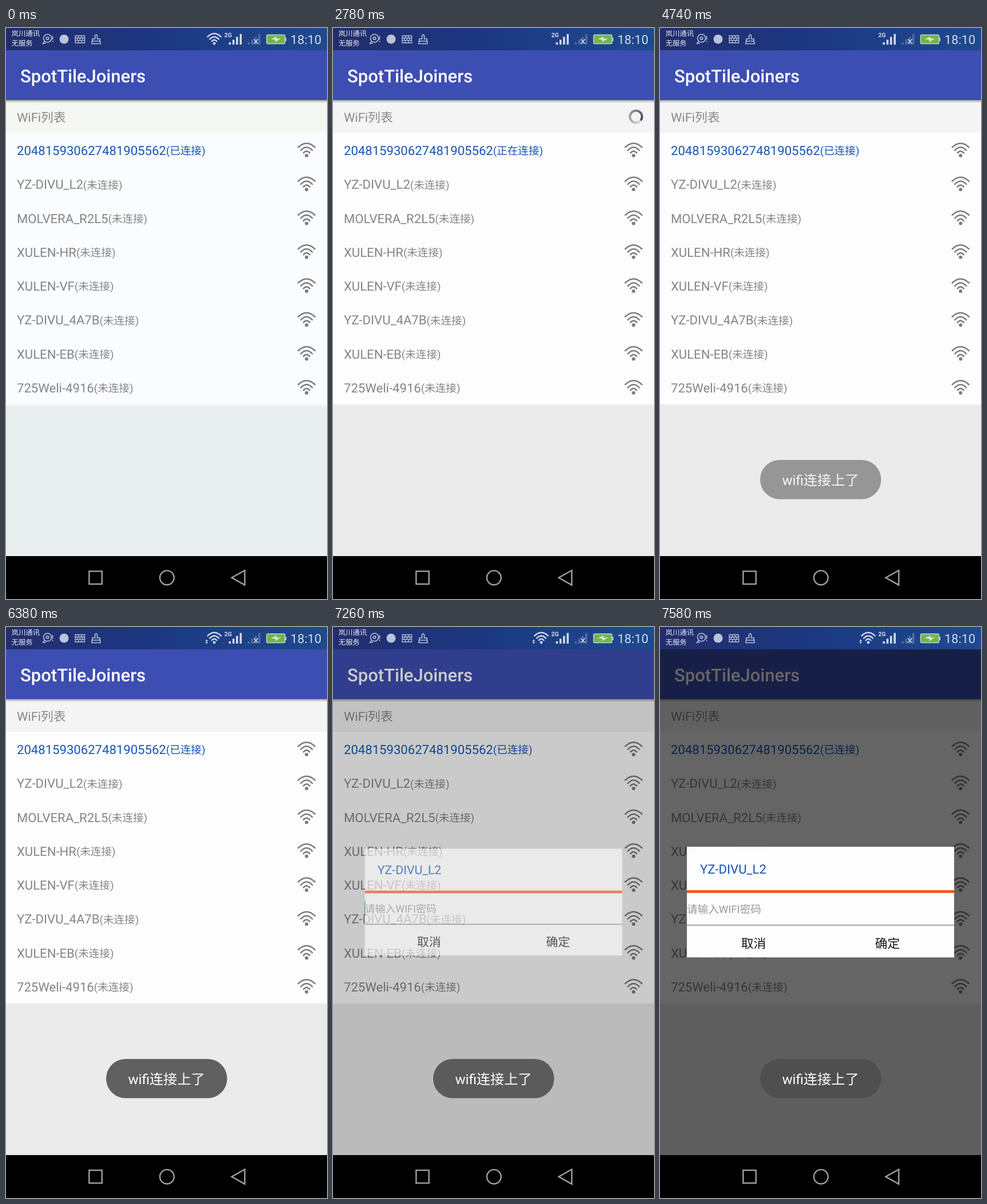
These frames come from a looping animation (561 by 998 pixels, 8000 ms). An HTML page:

```html
<!DOCTYPE html>
<html lang="zh-CN">
<head>
<meta charset="utf-8">
<title>Wi-Fi list</title>
<style>
  html, body { margin: 0; width: 100%; height: 100%; overflow: hidden; background: #000; }
  svg { display: block; width: 100%; height: 100%; }
  text { font-family: Roboto, 'Noto Sans CJK SC', 'Noto Sans CJK', sans-serif; text-rendering: geometricPrecision; }
  .row { font-size: 22.1px; fill: #858585; }
  .state { font-size: 18.6px; }
  .wifi path { fill: none; stroke-linecap: round; }
</style>
</head>
<body>
<svg viewBox="0 0 561 998" preserveAspectRatio="none">
  <defs>
    <linearGradient id="barFill">
      <stop offset="0" stop-color="#222e6c"/>
      <stop offset=".45" stop-color="#1c3782"/>
      <stop offset="1" stop-color="#1f4a8e"/>
    </linearGradient>
    <linearGradient id="shade" x2="0" y2="1">
      <stop offset="0" stop-opacity=".32"/>
      <stop offset="1" stop-opacity="0"/>
    </linearGradient>
    <g id="wifi" class="wifi">
      <path d="M-14.600-14.500Q0-28.500 14.600-14.500M-10-9.200Q0-19.600 10-9.200M-5.400-4.600Q0-11 5.400-4.600"/>
      <circle r="3" stroke="none"/>
    </g>
  </defs>

  <!-- page -->
  <rect id="page" y="39" width="561" height="884"/>
  <rect id="head" y="126" width="561" height="57"/>
  <rect id="list" y="183" width="561" height="475"/>
  <rect id="edge" y="658" width="561" height="3" fill="#f3f6f8"/>
  <text x="19" y="163.700" font-size="21.800" fill="#888">WiFi列表</text>
  <g id="rows"></g>
  <g id="spinner" fill="none" stroke-width="3.800"></g>
  <rect y="39" width="561" height="87" fill="#3d4eb2"/>
  <rect y="126" width="561" height="5" fill="url(#shade)"/>
  <text x="25" y="95" font-size="31" font-weight="500" fill="#fff">SpotTileJoiners</text>
  <rect id="dim" y="39" width="561" height="884"/>

  <!-- status bar -->
  <rect width="561" height="39" fill="url(#barFill)"/>
  <g fill="#d3dae8">
    <g font-size="12.400" font-weight="500" fill="#e6eaf4">
      <text x="9.500" y="13.500">岚川通讯</text>
      <text x="9.500" y="30.500">无服务</text>
    </g>
    <text x="497" y="28" font-size="21.800">18:10</text>
    <text x="381.500" y="15.500" font-size="10.500" font-weight="700">2G</text>
    <path d="M389.500 25h3.500v4h-3.500zM395.800 20.500h3.500v8.500h-3.500zM402 15.500h3.500v13.500h-3.500zM408.500 10.500h3.500v18.500h-3.500z"/>
    <path d="M422.500 25h3.500v4h-3.500zM428.500 20.500h3.500v8.500h-3.500zM434.800 15.500h3.500v13.500h-3.500zM441 10.500h3.500v18.500h-3.500z" opacity=".28"/>
    <path d="M433 19.500l7.500 8M440.500 19.500l-7.500 8" stroke="#d3dae8" stroke-width="1.600"/>
  </g>
  <g fill="none" stroke="#b9c3da" stroke-width="1.600">
    <circle cx="72.500" cy="18" r="7"/>
    <circle cx="72.500" cy="18" r="2.300"/>
    <path d="M67.500 23.500l-3 3.500h5M81.500 14v6.500M81.500 22.500v2"/>
    <circle cx="101.500" cy="19.500" r="8" fill="#b9c3da" stroke="none"/>
    <path d="M121 13.500h16.500v12.500h-16.500zM121 17.500h16.500M121 21.700h16.500M126.500 13.500v4M132 13.500v4M124.500 17.500v4M129.300 17.500v4M134 17.500v4M126.500 21.700v4M132 21.700v4" stroke-width="1.300"/>
    <path d="M155.500 19v-5.500q2-4 4 0v5.500h4.500l1 8.500h-15l1-8.500zM151 23h13"/>
  </g>
  <rect x="455.500" y="12" width="32" height="15.500" rx="2" fill="#70b64c" stroke="#c3d3cf" stroke-width="1.500"/>
  <path d="M488.500 17h1.500v6h-1.500zM463 19.500l10-4.500l-.5 3.700l8-.5l-10 6.300l.5-4z" fill="#dfeadb"/>
  <g id="signal">
    <use href="#wifi" transform="translate(364 27) scale(.8)" fill="#d0d8e8" stroke="#d0d8e8" stroke-width="2.900"/>
    <path id="arrows" d="M348.500 25l2.200-3.500 2.200 3.500zM348.500 26l2.200 3.500 2.200-3.500z" fill="#d0d8e8"/>
  </g>

  <!-- password dialog -->
  <g id="dialog">
    <rect x="47" y="384" width="467" height="193.500" fill="#fdfdfd"/>
    <text x="70" y="430.500" font-size="22.100" fill="#1652b2" id="dialogName"></text>
    <rect x="47" y="460" width="467" height="4.800" fill="#fb5423"/>
    <text x="47" y="500" font-size="18.600" fill="#999">请输入WIFI密码</text>
    <rect id="caret" x="46.500" y="479" width="1.600" height="26" fill="#2f8f96"/>
    <rect x="47" y="520.500" width="467" height="1.200" fill="#66668a"/>
    <g font-size="21.800" fill="#151515" text-anchor="middle">
      <text x="163.500" y="561">取消</text>
      <text x="397.500" y="561">确定</text>
    </g>
  </g>

  <g id="toast">
    <rect x="175" y="755" width="211.500" height="68.500" rx="34" fill="#4e4e4e" fill-opacity=".88"/>
    <text x="280.500" y="798.500" font-size="24.200" fill="#fff" text-anchor="middle">wifi连接上了</text>
  </g>

  <!-- navigation bar -->
  <rect y="923" width="561" height="75"/>
  <g fill="none" stroke="#a0a0a0" stroke-width="2.400">
    <rect x="145.300" y="949.500" width="22.400" height="22.400"/>
    <circle cx="281.300" cy="960.800" r="12.400"/>
    <path d="M394.500 960.800l22.800-12.800v25.600z"/>
  </g>
</svg>
<script>
const LOOP = 8000;
const BLUE = '#1756b4', GRAY = '#858585';
const names = [
  '204815930627481905562', 'YZ-DIVU_L2', 'MOLVERA_R2L5', 'XULEN-HR',
  'XULEN-VF', 'YZ-DIVU_4A7B', 'XULEN-EB', '725Weli-4916'
];
const $ = id => document.getElementById(id);
const clamp = v => Math.max(0, Math.min(1, v));
const span = (t, a, b) => clamp((t - a) / (b - a));
const fill = (id, color) => $(id).setAttribute('fill', color);
const fade = (id, v) => {
  $(id).setAttribute('opacity', v);
  $(id).style.display = v > 0 ? '' : 'none';
};

$('rows').innerHTML = names.map((name, i) => {
  const y = 222.2 + i * 59.25;
  return `<text class="row" x="19" y="${y}"><tspan>${name}</tspan><tspan class="state" dy="-.8">(未连接)</tspan></text>
    <use href="#wifi" x="525.3" y="${y + .8}" fill="#7c7c7c" stroke="#7c7c7c" stroke-width="2.5"/>`;
}).join('');
$('dialogName').textContent = names[1];
const [firstName, firstState] = document.querySelectorAll('#rows text:first-child tspan');

// Ring whose tone fades from a dark head back to a light tail.
const PARTS = 36;
$('spinner').innerHTML = Array.from({ length: PARTS }, (_, i) => {
  const step = 2 * Math.PI / PARTS;
  const at = a => `${10.5 * Math.cos(a)} ${10.5 * Math.sin(a)}`;
  const k = i / PARTS;
  const tone = [62, 62, 84].map(c => Math.round(c + (215 - c) * k)).join();
  return `<path d="M${at(-i * step)}A10.5 10.5 0 0 0 ${at(-(i + 1.1) * step)}" stroke="rgb(${tone})"/>`;
}).join('');

function setFirst(t) {
  let state = '已连接', color = BLUE, stateColor = BLUE;
  if (t >= 1780 && t < 2340) {
    state = '未连接';
    color = t < 1860 ? '#4f74b8' : GRAY;
    stateColor = GRAY;
  } else if (t >= 2340 && t < 4580) {
    state = '正在连接';
  }
  firstName.style.fill = color;
  firstState.style.fill = stateColor;
  firstState.textContent = `(${state})`;
}

function render(t) {
  const cool = t < 2020;
  fill('page', cool ? '#e9eeee' : '#ebebeb');
  fill('head', cool ? '#f4f7f2' : '#f4f4f4');
  fill('list', cool ? '#fafcff' : '#fdfdfd');
  fade('edge', t < 500 ? 1 : 0);
  setFirst(t);

  fade('signal', t < 1780 ? 1 : t < 2020 ? .8 * (1 - span(t, 1820, 2020)) : t < 5060 ? 0 : 1);
  fade('arrows', t >= 5340 ? 1 : 0);

  fade('spinner', t >= 2340 && t < 4580 ? 1 : 0);
  const tick = Math.floor((t - 2340) * 12 / 1000);
  $('spinner').setAttribute('transform', `translate(529.5 155) rotate(${tick * 30 - 110})`);

  const rise = span(t, 4620, 4940);
  fade('toast', 1 - (1 - rise) ** 2);

  fade('dim', .6 * span(t, 7180, 7420));
  const open = span(t, 7135, 7335), scale = .9 + .1 * open;
  fade('dialog', open);
  $('dialog').setAttribute('transform', `translate(280.5 480.7) scale(${scale}) translate(-280.5 -480.7)`);
  fade('caret', t < 7580 ? 1 : 0);
}

function frame() {
  render(performance.now() % LOOP);
  requestAnimationFrame(frame);
}
frame();
</script>
</body>
</html>
```
